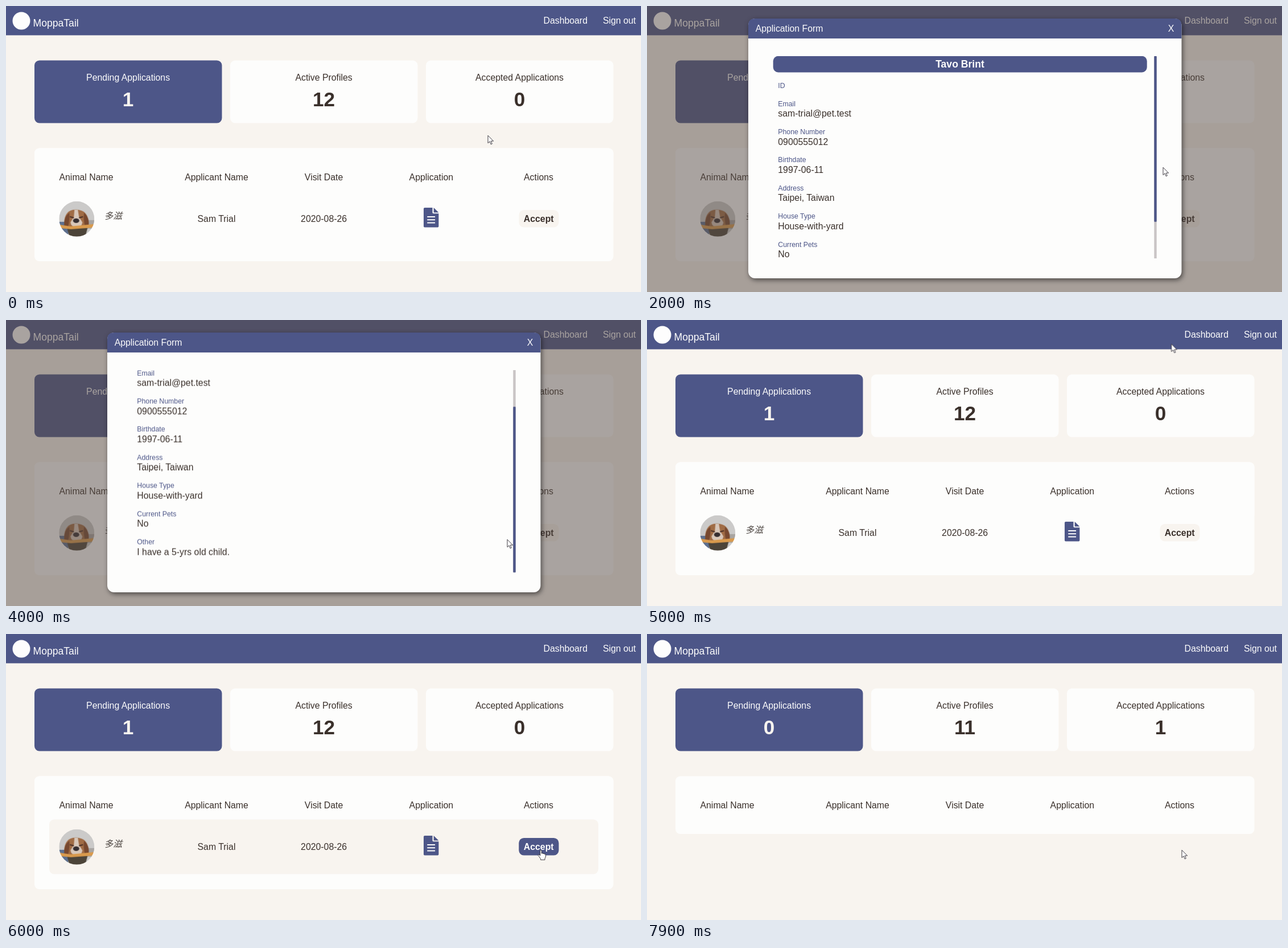
These frames come from a looping animation (1116x502 px, 8000 ms). An HTML page:

```html
<!DOCTYPE html>
<html lang="en">
<head>
<meta charset="utf-8">
<title>Adoption dashboard</title>
<style>
  :root { --blue: #4d5688; --ink: #3a302b; --sand: #f8f4ef; --card: #fdfdfc; }
  html, body { margin: 0; width: 100%; height: 100%; overflow: hidden; background: var(--sand); }
  svg { display: block; width: 1116px; height: 502px; font: 15.84px "Liberation Sans", Arial, sans-serif; }
  text { fill: var(--ink); white-space: pre; }
  .mid { text-anchor: middle; }
  .end { text-anchor: end; }
  .bold { font-weight: bold; }
  .big { font-size: 35.2px; font-weight: bold; }
  .mdl { font-size: 17.6px; }
  .blue { fill: var(--blue); }
  .sand { fill: var(--sand); }
  .card { fill: var(--card); }
  .white { fill: #fdfdfd; }
  .label { font-size: 12.32px; fill: var(--blue); }
  .pet { font-family: "Noto Sans CJK TC", "Noto Sans CJK SC", "Noto Sans CJK", sans-serif; font-weight: 300; font-style: italic; fill: #4c4541; }

  /* State switches: hard cuts within one 8 s loop */
  .before, .after, .row-hover, .btn-hover, .modal, .hand, .arrow { animation: 8s step-end infinite; }
  .before { animation-name: before; }
  .after { animation-name: after; }
  .row-hover { animation-name: row; }
  .btn-hover { animation-name: btn; }
  .modal { animation-name: modal; }
  .hand { animation-name: hand; }
  .arrow { animation-name: arrow; }
  @keyframes before { 0% { opacity: 1 } 93.75%, 100% { opacity: 0 } }
  @keyframes after { 0% { opacity: 0 } 93.75%, 100% { opacity: 1 } }
  @keyframes row { 0%, 17.5% { opacity: 0 } 7.5%, 70% { opacity: 1 } 93.75%, 100% { opacity: 0 } }
  @keyframes btn { 0% { opacity: 0 } 71.25% { opacity: 1 } 93.75%, 100% { opacity: 0 } }
  @keyframes modal { 0% { opacity: 0 } 17.5% { opacity: 1 } 61.25%, 100% { opacity: 0 } }
  @keyframes hand { 0%, 17.5%, 61.25% { opacity: 0 } 8.75%, 58%, 71.25% { opacity: 1 } 93.75%, 100% { opacity: 0 } }
  @keyframes arrow { 0%, 17.5%, 61.25% { opacity: 1 } 8.75%, 58%, 71.25% { opacity: 0 } 93.75%, 100% { opacity: 1 } }

  /* Pointer path, with the scrollbar drag in step */
  .pointer { animation: move 8s ease-in-out infinite; }
  @keyframes move {
    0%, 3% { transform: translate(847px, 227px) }
    11%, 18% { transform: translate(748px, 374px) }
    24%, 25.5% { transform: translate(907px, 283px) }
    30%, 31% { transform: translate(893px, 300px) }
    40% { transform: translate(888px, 365px) }
    45%, 53% { transform: translate(881px, 385px) }
    59%, 61% { transform: translate(921px, 40px) }
    63.75%, 64% { transform: translate(922px, 43px) }
    73%, 100% { transform: translate(940px, 379px) }
  }
  .page, .thumb { animation: page 8s ease-in-out infinite; }
  .thumb { animation-name: thumb; }
  @keyframes page { 0%, 31% { transform: translateY(0) } 40%, 100% { transform: translateY(-78.4px) } }
  @keyframes thumb { 0%, 31% { transform: translateY(0) } 40%, 100% { transform: translateY(64.3px) } }
</style>
</head>
<body>
<svg viewBox="0 0 1116 502">
  <defs>
    <clipPath id="face"><circle cx="31" cy="31" r="31"/></clipPath>
    <clipPath id="view"><rect x="200" y="88" width="720" height="355"/></clipPath>
  </defs>

  <rect class="sand" width="1116" height="502"/>

  <!-- Header -->
  <rect class="blue" width="1116" height="51.4"/>
  <circle class="white" cx="27" cy="26" r="15.5"/>
  <text class="white mdl" x="47.5" y="36">MoppaTail</text>
  <text class="white" x="944.5" y="30.5">Dashboard</text>
  <text class="white end" x="1107" y="30.5">Sign out</text>

  <!-- Summary cards -->
  <rect class="blue" x="50" y="95.5" width="329.5" height="110" rx="8.8"/>
  <rect class="card" x="394" y="95.5" width="329.5" height="110" rx="8.8"/>
  <rect class="card" x="738" y="95.5" width="329.5" height="110" rx="8.8"/>
  <g class="mid">
    <text class="white" x="214.6" y="131">Pending Applications</text>
    <text x="558.6" y="131">Active Profiles</text>
    <text x="902.5" y="131">Accepted Applications</text>
    <g class="before big">
      <text class="sand" x="214.6" y="176">1</text>
      <text x="558.6" y="176">12</text>
      <text x="902.5" y="176">0</text>
    </g>
    <g class="after big">
      <text class="sand" x="214.6" y="176">0</text>
      <text x="558.6" y="176">11</text>
      <text x="902.5" y="176">1</text>
    </g>
  </g>

  <!-- Table -->
  <rect class="card" x="50" y="249.5" width="1017.5" height="101.5" rx="8.8"/>
  <rect class="card before" x="50" y="249.5" width="1017.5" height="198.5" rx="8.8"/>
  <text x="93.5" y="305.5">Animal Name</text>
  <g class="mid">
    <text x="370" y="305.5">Applicant Name</text>
    <text x="558.6" y="305.5">Visit Date</text>
    <text x="747.3" y="305.5">Application</text>
    <text x="936" y="305.5">Actions</text>
  </g>
  <g class="before">
    <rect class="sand row-hover" x="76" y="325.5" width="965" height="96" rx="8.8"/>
    <g transform="translate(93.3 342.8)" clip-path="url(#face)">
      <rect width="62" height="62" fill="#cbcac9"/>
      <path d="M0 36H16V62H0Z" fill="#5d6f8e"/>
      <path d="M44 33H62V48H44Z" fill="#a9a5a2"/>
      <path d="M9 42C8 28 13 17 24 15Q34 13 43 18Q53 25 52 44L44 46 31 50 17 46Z" fill="#a06c45"/>
      <path d="M9 43Q8 27 18 20Q19 32 16 44Z M52 44Q54 29 44 20Q42 32 46 45Z" fill="#77482f"/>
      <path d="M27 15H33L35 27 41 37Q40 45 31 46Q21 45 20 37L26 27Z" fill="#d8c7b9"/>
      <path d="M19 27L26 29M35 29L42 27" stroke="#4a3027" stroke-width="2"/>
      <ellipse cx="30" cy="34" rx="5.5" ry="4" fill="#342d30"/>
      <path d="M14 47H50L46 62H18Z" fill="#4c4439"/>
      <path d="M1 41L20 44 61 40V46L21 49 1 47Z" fill="#d99a4d"/>
    </g>
    <text class="pet" x="172.5" y="374">多滋</text>
    <g class="mid">
      <text x="370" y="378.5">Sam Trial</text>
      <text x="558.6" y="378.5">2020-08-26</text>
    </g>
    <g transform="translate(734 354)">
      <path class="blue" d="M2 0H15.5V8.5Q15.5 10.3 17.3 10.3H26.4V32.8Q26.4 34.5 24.7 34.5H1.8Q0 34.5 0 32.8V1.8Q0 0 2 0ZM17.7 0L26.4 8.4H17.7Z"/>
      <path d="M6.3 16H20.1M6.3 21.2H20.1M6.3 26.4H20.1" stroke="#fdfdfc" stroke-width="2"/>
    </g>
    <rect class="sand" x="901.5" y="358" width="70" height="30.5" rx="8.8"/>
    <text class="mid bold" x="936.2" y="378.5">Accept</text>
    <g class="btn-hover">
      <rect class="blue" x="901.3" y="358" width="70.2" height="30.5" rx="8.8"/>
      <text class="mid bold white" x="936.2" y="378.5">Accept</text>
    </g>
  </g>

  <!-- Application form -->
  <g class="modal">
    <rect width="1116" height="502" fill="rgb(87,75,68)" fill-opacity=".5"/>
    <rect class="card" x="178" y="22" width="761.5" height="456" rx="12" style="filter:drop-shadow(2px 3px 4px rgba(0,0,0,.55))"/>
    <path class="blue" d="M178 57V34Q178 22 190 22H927.5Q939.5 22 939.5 34V57Z"/>
    <text class="white" x="190.7" y="44.5">Application Form</text>
    <text class="white mid" x="921" y="44.5">X</text>
    <g clip-path="url(#view)">
      <g class="page">
        <rect class="blue" x="221.7" y="87.8" width="657" height="28.6" rx="8.8"/>
        <text class="white mid bold mdl" x="550" y="108">Tavo Brint</text>
        <text class="label" x="230.3" y="143.5">ID</text>
        <g id="fields"></g>
      </g>
    </g>
    <rect x="891.3" y="88" width="4.4" height="355" fill="#c9c5c5"/>
    <rect class="blue thumb" x="891.3" y="88" width="4.4" height="290.7" rx="1"/>
  </g>

  <!-- Pointer -->
  <g class="pointer" fill="#fff" stroke="#2b2830" stroke-width=".9" stroke-linejoin="round">
    <path class="arrow" d="M0 .3V13.6L3.1 10.8 5.2 15.8 7.3 14.9 5.2 10.1H9.6Z"/>
    <path class="hand" d="M-1.2 1.2Q0 -.6 1.3 1.2V6.2L2.6 5.6 4 6.6 5.4 6.2 6.5 7.4Q8.4 6.8 8.5 8.8V12L7 15V17.4H-.4V15.6L-3.2 11.6Q-5.8 8.8 -4.2 8.2Q-3.2 7.8 -1.2 10Z"/>
  </g>
</svg>
<script>
  const fields = [
    ['Email', 'sam-trial@pet.test'],
    ['Phone Number', '0900555012'],
    ['Birthdate', '1997-06-11'],
    ['Address', 'Taipei, Taiwan'],
    ['House Type', 'House-with-yard'],
    ['Current Pets', 'No'],
    ['Other', 'I have a 5-yrs old child.'],
  ];
  document.getElementById('fields').innerHTML = fields.map(([label, value], i) => {
    const y = 175.5 + 49.43 * i;
    return `<text class="label" x="230.3" y="${y}">${label}</text><text x="230.3" y="${y + 18.6}">${value}</text>`;
  }).join('');
</script>
</body>
</html>
```
